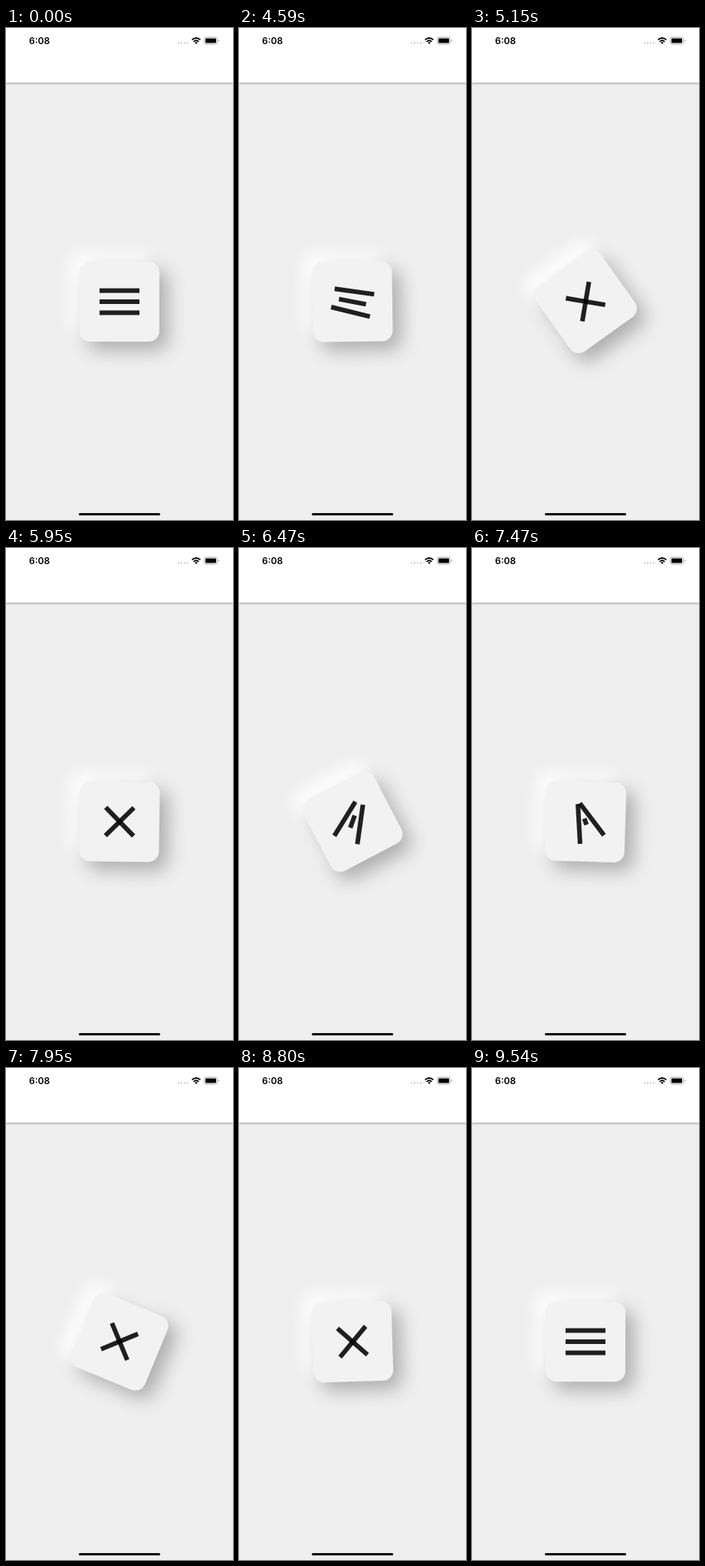
Animation of 296 by 640 pixels, one loop 9680 ms. Source, as an HTML page:

```html
<!DOCTYPE html>
<html lang="en">
<head>
<meta charset="utf-8">
<title>Menu toggle</title>
<style>
html, body { margin: 0; width: 100%; height: 100%; overflow: hidden; background: #efefef; }
.app-bar {
  position: absolute; left: 0; top: 0; width: 296px; height: 71px;
  background: #fff; box-shadow: 0 1px 3px rgba(0, 0, 0, .38);
}
.clock { position: absolute; left: 30px; top: 9px; font: 600 12px/15px Inter, sans-serif; color: #000; }
.status { position: absolute; left: 220px; top: 8px; }
.home { position: absolute; left: 95px; top: 630.6px; width: 106px; height: 3.4px; border-radius: 2px; background: #000; }
.card {
  position: absolute; left: 96px; top: 304px; width: 104px; height: 104px;
  border-radius: 14px; background: #f2f2f2;
}
.line {
  position: absolute; left: 26px; top: 49.1px; width: 52px; height: 5.8px;
  background: rgba(0, 0, 0, .87);
}
</style>
</head>
<body>
<div class="app-bar">
  <div class="clock">6:08</div>
  <svg class="status" width="64" height="18">
    <path d="M5.2 11.5H18" stroke="#c4c4c4" stroke-width="2.2" stroke-linecap="round" stroke-dasharray="0 3.9"/>
    <g fill="none" stroke="#000" stroke-width="1.8">
      <path d="M22.6 7.4Q28 2.6 33.4 7.4"/>
      <path d="M24.7 9.8Q28 6.8 31.3 9.8"/>
    </g>
    <path d="M26.2 11Q28 9.6 29.8 11L28 12.9Z"/>
    <rect x="38.5" y="4" width="17" height="9" rx="2.6" fill="none" stroke="#a8a8a8"/>
    <rect x="40" y="5.5" width="14" height="6" rx="1.3"/>
    <path d="M57 7v3q1.3-.4 1.3-1.5T57 7" fill="#a8a8a8"/>
  </svg>
</div>
<div class="card">
  <div class="line"></div><div class="line"></div><div class="line"></div>
</div>
<div class="home"></div>
<script>
const LOOP = 9680, ICON_MS = 665, GAP = 14.4;
const card = document.querySelector('.card');
const [upper, middle, lower] = document.querySelectorAll('.line');

// Per tap, in ms: first visible change, refresh interval,
// start of the icon morph, and midpoint of the card's spin.
const taps = [
  { open: true, first: 4590, step: 140, icon: 4487, mid: 5144 },
  { open: false, first: 5950, step: 130, icon: 6029, mid: 6510 },
  { open: true, first: 7340, step: 130, icon: 7192, mid: 7910 },
  { open: false, first: 8580, step: 110, icon: 8750, mid: 9240 }
];

const clamp = x => Math.min(1, Math.max(0, x));

function elasticInOut(x) {
  if (x <= 0 || x >= 1) return clamp(x);
  const t = 2 * x - 1;
  const wave = Math.sin((t - .1) * 5 * Math.PI) / 2;
  return t < 0 ? -(2 ** (10 * t)) * wave : 1 + 2 ** (-10 * t) * wave;
}

// The card winds up slowly, then settles fast.
const spinTime = dt => .5 + dt / (dt < 0 ? 2000 : 500);

// The light stays at the upper left while the card turns.
function shadow(offset, blur, color, angle) {
  const a = Math.PI / 4 - angle * Math.PI / 180;
  const r = offset * Math.SQRT2;
  return `${r * Math.cos(a)}px ${r * Math.sin(a)}px ${blur}px ${color}`;
}

function placeLine(line, orbit, y, angle) {
  line.style.transform = `rotate(${orbit}deg) translateY(${y}px) rotate(${angle - orbit}deg)`;
}

function pose(turn, p) {
  const angle = 90 * turn;
  const q = p * p * (3 - 2 * p);
  const y = GAP * (1 - q);
  card.style.transform = `rotate(${angle}deg)`;
  card.style.boxShadow = shadow(11, 25, '#adadad', angle) + ',' + shadow(-11, 20, '#fff', angle);
  placeLine(upper, 180 * q, -y, 135 * q);
  placeLine(lower, 180 * q, y, 225 * q);
  middle.style.transform = `rotate(${180 * q}deg) scaleX(${clamp(1 - 2 * p)})`;
}

function draw(ms) {
  const tap = taps.findLast(s => ms >= s.first);
  if (!tap) return pose(0, 0);
  const t = ms - (ms - tap.first) % tap.step;
  const direct = v => tap.open ? v : 1 - v;
  pose(direct(elasticInOut(spinTime(t - tap.mid))), direct(clamp((t - tap.icon) / ICON_MS)));
}

const start = performance.now();
function frame() {
  draw((performance.now() - start) % LOOP);
  requestAnimationFrame(frame);
}
frame();
</script>
</body>
</html>
```
